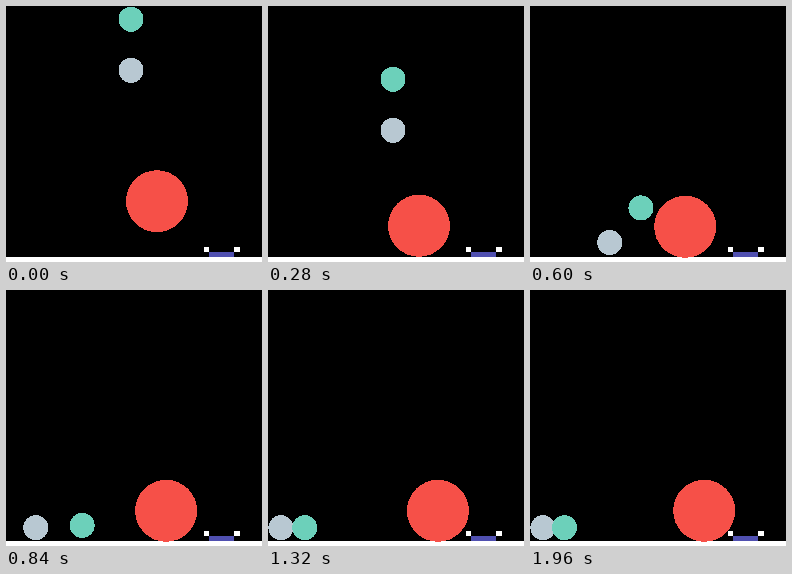
Write an HTML page that moves like this. It is 256 by 256 pixels and loops after 2 s.

```html
<!DOCTYPE html>
<html lang="en">
<head>
<meta charset="utf-8">
<title>Falling balls</title>
<style>
  html, body { margin: 0; width: 100%; height: 100%; overflow: hidden; background: #000; }
  svg { display: block; width: 100vw; height: 100vh; }
</style>
</head>
<body>
<svg viewBox="0 0 256 256" shape-rendering="crispEdges">
  <rect width="256" height="256" fill="#000"/>
  <rect y="251" width="256" height="5" fill="#fff"/>
  <rect x="203" y="246" width="25" height="5" fill="#5050b0"/>
  <rect x="198" y="241" width="5" height="5" fill="#fff"/>
  <rect x="228" y="241" width="6" height="5" fill="#fff"/>
  <circle id="red" r="31" fill="#f65048"/>
  <circle id="gray" r="12.5" fill="#b8c8d2"/>
  <circle id="teal" r="12.5" fill="#6cd0ba"/>
</svg>
<script>
  const LOOP = 2000, STEP = 20, G = 1530, REST = 237.7;

  // Each leg runs from one contact to the next: start (s), x, y, vx, vy, gravity.
  const legs = {
    red: [
      [0, 151, 195.2, 0, 0, G],
      [.181, 151, 220.2, 0, -80, G],
      [.286, 151, 220.2, 0, 0, 0],
      [.396, 151, 220.8, 20.5, 0, 0],
      [1.53, 174.2, 220.8, 0, 0, 0]
    ],
    gray: [
      [0, 125, 64.4, 0, 0, G],
      [.396, 125, 184.4, -232, 80, G],
      [.456, 111.1, 191.9, -222, 350, G],
      [.563, 87.4, REST, -208, -60, G],
      [.641, 71.2, REST, -208, 0, 0],
      [.923, 12.5, REST, 40, 0, 0],
      [1.065, 18.2, REST, -34, 0, 0],
      [1.22, 12.9, REST, 0, 0, 0]
    ],
    teal: [
      [0, 125, 13.3, 0, 0, G],
      [.456, 125, 172.4, 0, 340, G],
      [.498, 125, 188, -138, 58, G],
      [.718, 94.6, REST, -151, -112, G],
      [.864, 72.5, REST, -147, 0, 0],
      [1.065, 43, REST, -44, 0, 0],
      [1.17, 38.4, REST, -22, 0, 0],
      [1.22, 37.2, REST, -4.7, 0, 0],
      [1.54, 35.7, REST, -2.9, 0, 0]
    ]
  };

  const balls = Object.entries(legs).map(([id, path]) => ({ el: document.getElementById(id), path }));

  function place({ el, path }, t) {
    const [start, x, y, vx, vy, g] = path.filter(leg => leg[0] <= t).pop();
    const d = t - start;
    el.setAttribute("cx", x + vx * d);
    el.setAttribute("cy", y + vy * d + g * d * d / 2);
  }

  const origin = performance.now();

  function draw() {
    const ms = (performance.now() - origin) % LOOP;
    const t = Math.floor(ms / STEP) * STEP / 1000;
    balls.forEach(ball => place(ball, t));
    requestAnimationFrame(draw);
  }
  draw();
</script>
</body>
</html>
```
